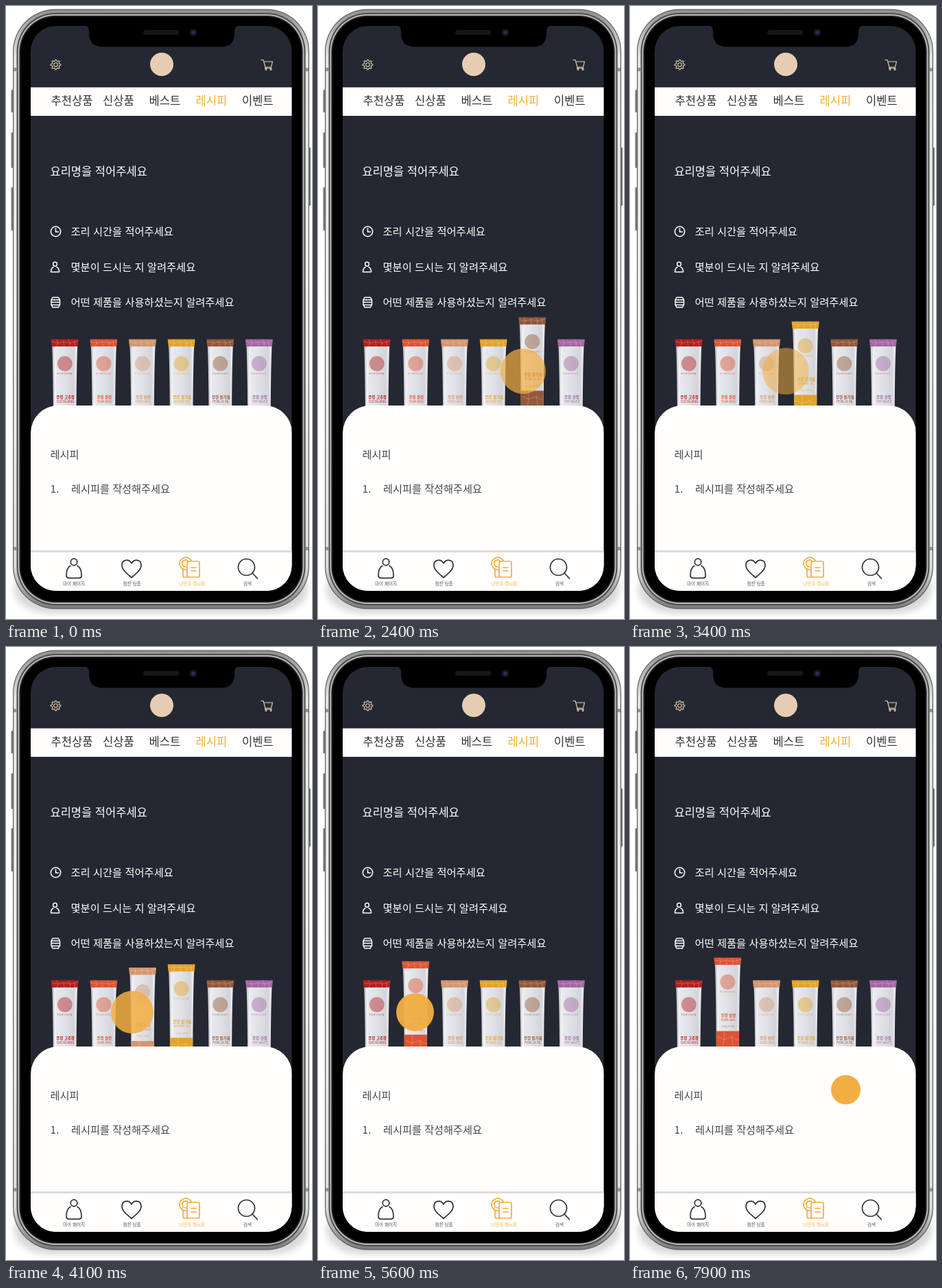
Animation, 446 px wide and 893 px high, one loop 8000 ms. Source, as an HTML page:

```html
<!DOCTYPE html>
<html lang="ko">
<head>
<meta charset="utf-8">
<title>레시피 작성</title>
<style>
  html, body { margin: 0; width: 100%; height: 100%; overflow: hidden; background: #fff; }
  svg { display: block; width: 100vw; height: 100vh; }
  text { font-family: "Noto Sans CJK KR", "Noto Sans CJK", "Noto Sans", sans-serif; }
  .line { fill: none; stroke-linecap: round; stroke-linejoin: round; }
  .nav { font-size: 16.6px; fill: #30333b; }
  .ask { font-size: 15.3px; fill: #fff; }
  .note { font-size: 15.2px; fill: #45464a; }
  .tab { font-size: 6.6px; fill: #55585f; text-anchor: middle; }
  .nav .on, .tab .on { fill: #f0ae3c; }
  .pack { text-anchor: middle; }
</style>
</head>
<body>
<svg viewBox="0 0 446 893" preserveAspectRatio="none">
  <defs>
    <filter id="soft" x="-20%" y="-100%" width="140%" height="300%"><feGaussianBlur stdDeviation="5"/></filter>
    <linearGradient id="foil">
      <stop offset="0" stop-color="#c3c4c9"/><stop offset=".14" stop-color="#e9eaed"/>
      <stop offset=".5" stop-color="#e0e1e6"/><stop offset=".85" stop-color="#d3d4da"/>
      <stop offset="1" stop-color="#f4f4f6"/>
    </linearGradient>
    <linearGradient id="steel" x2="0" y2="1">
      <stop offset="0" stop-color="#8d918d"/><stop offset=".08" stop-color="#e4e5e3"/>
      <stop offset=".5" stop-color="#f1f1f0"/><stop offset=".93" stop-color="#dcdddc"/>
      <stop offset="1" stop-color="#777a78"/>
    </linearGradient>
    <clipPath id="screen"><rect x="36" y="29" width="380.5" height="823" rx="37"/></clipPath>
  </defs>
  <rect width="446" height="893" fill="#fff"/>
  <rect x="12" y="815" width="428" height="70" rx="52" fill="#b9b9b9" opacity=".55" filter="url(#soft)"/>

  <g fill="#777b78">
    <rect x="7.5" y="122" width="5" height="33" rx="1.5"/>
    <rect x="7.5" y="184" width="5" height="52" rx="1.5"/>
    <rect x="7.5" y="264" width="5" height="63" rx="1.5"/>
    <rect x="439" y="206" width="5" height="85" rx="1.5"/>
  </g>
  <g id="body"></g>
  <g fill="#8f9290">
    <rect x="11" y="90" width="5" height="5"/><rect x="436" y="90" width="5" height="5"/>
    <rect x="11" y="788" width="5" height="5"/><rect x="436" y="788" width="5" height="5"/>
  </g>

  <g clip-path="url(#screen)">
    <rect x="36" y="29" width="381" height="823" fill="#242832"/>
    <rect x="36" y="118.5" width="381" height="41.5" fill="#fffefd"/>
    <g class="line" stroke="#e6cdb2" stroke-width="1.1">
      <path id="gear"/><circle cx="72.5" cy="85.5" r="2.7"/>
      <path d="M372 78.5h3l3 10.500h8.500l2-8H376M378 89l-.5 1.500h9.500"/>
      <circle cx="379" cy="92.300" r="1.1"/><circle cx="386" cy="92.300" r="1.1"/>
    </g>
    <circle cx="227" cy="85" r="17" fill="#e6cdb2"/>

    <g class="nav">
      <text x="65.500" y="144">추천상품</text><text x="141" y="144">신상품</text>
      <text x="208.500" y="144">베스트</text><text class="on" x="276.500" y="144">레시피</text>
      <text x="344" y="144">이벤트</text>
    </g>
    <text x="64.500" y="247" font-size="16.5" font-weight="500" fill="#fff">요리명을 적어주세요</text>
    <g class="ask">
      <text x="94.500" y="334">조리 시간을 적어주세요</text>
      <text x="94.500" y="385.500">몇분이 드시는 지 알려주세요</text>
      <text x="94.500" y="437">어떤 제품을 사용하셨는지 알려주세요</text>
    </g>
    <g class="line" stroke="#fff" stroke-width="1.500">
      <circle cx="72.5" cy="328.500" r="7.2"/><path d="M72.500 324v5h4"/>
      <circle cx="71.500" cy="376" r="2.900"/>
      <path d="M69 380.500c-2.500 1-3.500 3.500-3.500 7h12c0-3.500-1-6-3.500-7"/>
      <path d="M68 424.500h8.500l2 3.500h-12.500zM66 428v3.500h12.500v-3.500M66 431.500v4h12.500v-4M66.500 435.500l1.500 3.500h8.500l1.500-3.500"/>
    </g>

    <g id="packs"></g>

    <path d="M36 852V622a40 40 0 0 1 40-40H377a40 40 0 0 1 40 40V852z" fill="#fffefd"/>
    <g class="note">
      <text x="64.500" y="659">레시피</text><text x="64.500" y="709">1.</text>
      <text x="95" y="709">레시피를 작성해주세요</text>
    </g>
    <rect x="36" y="793" width="381" height="3" fill="#dcdcde"/>
    <rect x="36" y="796" width="381" height="56" fill="#fffefd"/>
    <g class="line" stroke="#2a2e39" stroke-width="1.700">
      <circle cx="99" cy="810" r="4.800"/>
      <path d="M94 815.500c-4 2-6 7-6 14q0 3.800 3.500 3.800h15q3.500 0 3.500-3.800c0-7-2-12-6-14"/>
      <path d="M183 832.500C175 826 169 821 169 814.500c0-8 10.500-10 14-2.500 3.500-7.500 14-5.500 14 2.500 0 6.500-6 11.500-14 18z"/>
      <circle cx="350.500" cy="817.500" r="12"/><path d="M359 826l7.500 8"/>
    </g>
    <g class="line" stroke="#f0ae3c" stroke-width="1.700">
      <path d="M264 821a9 9 0 1 1 6-13M262 817a5 5 0 1 1 4-7.500"/>
      <path d="M268 809h12q2 0 2 2v19q0 2-2 2h-14q-2 0-2-2v-17q0-4 4-4zM258 821v9q0 2 2 2h4M270 818h7M270 823h7"/>
    </g>
    <g class="tab">
      <text x="99" y="844">마이 페이지</text><text x="183.500" y="844">찜한 상품</text>
      <text class="on" x="271" y="844">나만의 레시피</text><text x="352" y="844">검색</text>
    </g>
    <circle id="touch" fill="#f2ae42"/>
  </g>

  <path d="M113 28.500q8 0 8 8v3q0 20 20 20H313q20 0 20-20v-3q0-8 8-8z" fill="#000"/>
  <rect x="200" y="35" width="52" height="7" rx="3.500" fill="#17171a"/>
  <circle cx="273" cy="38.500" r="5.500" fill="#15161c"/><circle cx="273" cy="38.500" r="2.500" fill="#28335c"/>
</svg>
<script>
const LOOP = 8000, STEP = 100, REST = 485, LIFT = 33;
const $ = id => document.getElementById(id);

// Phone rim: nested rounded bands from the outside in
$('body').innerHTML = [
  [10, '#5b5f5c'], [11.2, 'url(#steel)'], [15.5, '#4b4f4d'], [17.5, '#b9bbba'], [19.5, '#1d1f1f'], [21.5, '#000']
].map(([x, fill]) =>
  `<rect x="${x}" y="${x - 5.5}" width="${452 - 2 * x}" height="${894 - 2 * x}" rx="${72 - x}" fill="${fill}"/>`).join('');

$('gear').setAttribute('d', 'M' + Array.from({ length: 32 }, (_, i) => {
  const a = (i - 0.5) * Math.PI / 16, r = i % 4 < 2 ? 7.3 : 5.3;
  return (72.5 + r * Math.cos(a)).toFixed(2) + ' ' + (85.5 + r * Math.sin(a)).toFixed(2);
}).join('L') + 'z');

// up / down: when a pack starts to rise and to sink
const packs = [
  { name: '고추장', sub: 'GOCHUJANG', color: '#b3201f' },
  { name: '쌈장', sub: 'SSAMJANG', color: '#dc5433', up: 4950 },
  { name: '된장', sub: 'DOENJANG', color: '#d39670', up: 3735, down: 4950 },
  { name: '참기름', sub: 'SESAME OIL', color: '#e3a32b', up: 2820, down: 3870 },
  { name: '들기름', sub: 'PERILLA OIL', color: '#94583a', up: 1500, down: 2800 },
  { name: '간장', sub: 'SOY SAUCE', color: '#a566a5' }
];

const packArt = ({ name, sub, color }) => `
  <path d="M-18.500 10Q-17 40-16.500 140h33Q17 40 18.500 10z" fill="url(#foil)"/>
  <path d="M-16.500 107.500h33V140h-33z" fill="${color}"/>
  <path d="M-20 .5h40l-1 10.500h-38z" fill="${color}"/>
  <path class="line" d="M-19 4l9 2 8-2 10 2 11-3M-12 1l2 5-2 5M-2 4l1 7M5 1l3 5-1 5M14 4l1 7M-14 116l9 4 11-4 9 5M-5 108v12l-3 12M6 116l2 14" stroke="#fff" stroke-width=".6" opacity=".4"/>
  <path d="M-14.500 14q1 30 1 93" class="line" stroke="#fff" stroke-width="1.500" opacity=".6"/>
  <circle cy="36" r="11" fill="${color}" opacity=".45"/>
  <g class="pack" fill="${color}">
    <text y="52" font-size="4" letter-spacing=".6" opacity=".7">PURYEON</text>
    <text x="1" y="86.500" font-size="5.500" font-weight="700">푸령 ${name}</text>
    <text x="1" y="92.500" font-size="4.200">${sub}</text>
    <text x="1" y="102" font-size="3.500" opacity=".8">120g 10개입</text>
  </g>`;

$('packs').innerHTML = packs.map(p => `<g>${packArt(p)}</g>`).join('');
const packNodes = [...$('packs').children];

const clamp = x => Math.min(1, Math.max(0, x));
const easeOut = x => 1 - (1 - x) ** 2;
const easeInOut = x => x < 0.5 ? 2 * x * x : 1 - 2 * (1 - x) ** 2;

function along(keys, t) {
  const i = keys.findIndex(k => k[0] > t);
  if (i < 0) return keys[keys.length - 1][1];
  if (!i) return keys[0][1];
  const [t0, a] = keys[i - 1], [t1, b] = keys[i];
  return a + (b - a) * (t - t0) / (t1 - t0);
}

const dragX = [[2150, 313], [2400, 299], [2900, 251], [3400, 227], [3800, 199], [4100, 184], [4700, 155], [4900, 149], [5200, 141.5]];
const radius = [[1100, 17], [1700, 21.5], [2000, 29], [2150, 32], [2400, 33], [2900, 34.5], [3400, 34],
  [4100, 31], [4700, 27], [4900, 26], [5600, 27.5], [6500, 27], [7000, 32]];
const alpha = [[1100, 0], [1700, 1], [2000, 0.85], [2400, 0.7], [3000, 0.5], [3400, 0.52], [4100, 0.85],
  [4900, 0.95], [5600, 0.95], [6500, 0.75], [7000, 0]];
const tapRadius = [[7300, 17], [7800, 21.5]];
const tapAlpha = [[7300, 0], [7900, 1]];

function lift({ up, down }, t) {
  if (up === undefined) return 0;
  const rise = easeOut(clamp((t - up) / 1080));
  const sink = down ? easeInOut(clamp((t - down) / 600)) : 0;
  return LIFT * rise * (1 - sink);
}

function draw(t) {
  packs.forEach((p, i) => packNodes[i].setAttribute('transform',
    `translate(${85.7 + 56.65 * i} ${(REST - lift(p, t)).toFixed(2)})`));
  const tap = t >= 7300;
  const look = {
    cx: tap ? 314.5 : along(dragX, t),
    cy: tap ? 645 : 532,
    r: along(tap ? tapRadius : radius, t),
    opacity: along(tap ? tapAlpha : alpha, t)
  };
  for (const k in look) $('touch').setAttribute(k, look[k]);
}

const start = performance.now();
function tick() {
  const t = (performance.now() - start) % LOOP;
  draw(Math.floor(t / STEP) * STEP);
  requestAnimationFrame(tick);
}
tick();
</script>
</body>
</html>
```
